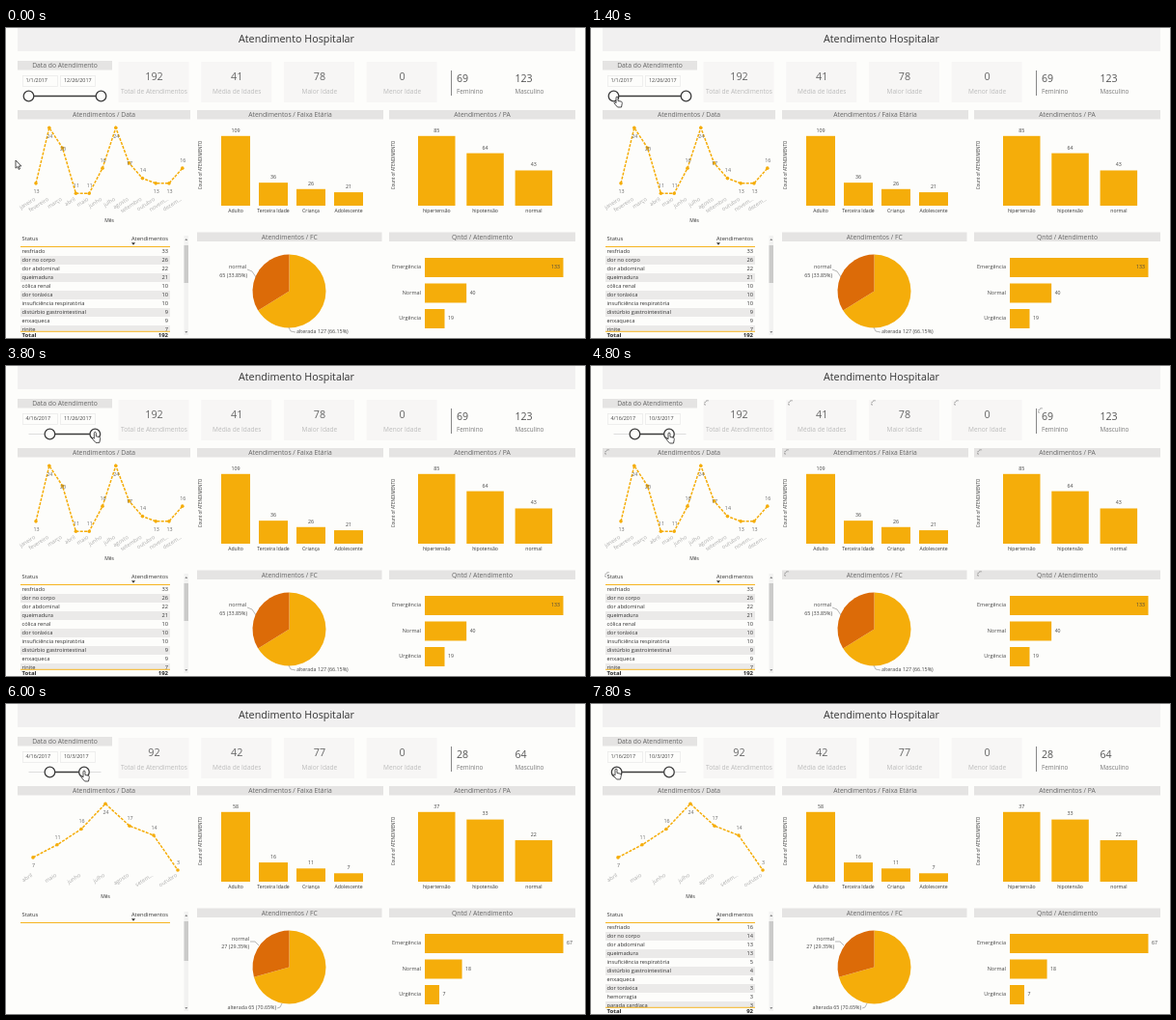
Write an HTML page with a canvas that moves like this. It is 600 px wide and 321 px high and loops after 8000 ms.

```html
<!DOCTYPE html>
<html lang="pt">
<head>
<meta charset="utf-8">
<title>Atendimento Hospitalar</title>
<style>
html, body { margin: 0; width: 100%; height: 100%; overflow: hidden; background: #fdfdfb; }
canvas { display: block; width: 600px; height: 321px; }
</style>
</head>
<body>
<canvas id="stage"></canvas>
<script>
const canvas = document.getElementById('stage');
const ctx = canvas.getContext('2d');
const ratio = window.devicePixelRatio || 1;
canvas.width = 600 * ratio;
canvas.height = 321 * ratio;

const LOOP = 8000, STEP = 200, SWAP = 5400, TABLE_READY = 6200;
const PAPER = '#fdfdfb', AMBER = '#f5ad0a', RUST = '#dc6b08', INK = '#444';

const before = {
  cards: [192, 41, 78, 0], gender: [69, 123],
  months: ['janeiro', 'fevereiro', 'março', 'abril', 'maio', 'junho', 'julho', 'agosto', 'setembro', 'outubro', 'novem…', 'dezem…'],
  line: [13, 24, 20, 11, 11, 16, 24, 17, 14, 13, 13, 16],
  lineX: 31, lineStep: 13.8, lineScale: 5.23, below: [0, 1, 6, 9, 10], beside: [2, 7], axisX: 107,
  ages: [109, 36, 26, 21], pressure: [85, 64, 43], urgency: [133, 40, 19],
  normal: 0.3385,
  pieLabels: [['normal', 249, 248, 'right'], ['65 (33.85%)', 250, 256.5, 'right'], ['alterada 127 (66.15%)', 301, 315, 'left']],
  leaders: [[250, 250, 255, 252, 259, 258], [293, 310, 295, 314, 300, 315]],
  rows: [['resfriado', 33], ['dor no corpo', 26], ['dor abdominal', 22], ['queimadura', 21], ['cólica renal', 10],
    ['dor toráxica', 10], ['insuficiência respiratória', 10], ['distúrbio gastrointestinal', 9], ['enxaqueca', 9], ['rinite', 7]],
  thumb: 39
};
const after = {
  cards: [92, 42, 77, 0], gender: [28, 64],
  months: ['abril', 'maio', 'junho', 'julho', 'agosto', 'setem…', 'outubro'],
  line: [7, 11, 16, 24, 17, 14, 3],
  lineX: 28, lineStep: 25, lineScale: 3.27, below: [0, 3], beside: [], axisX: 103,
  ages: [58, 16, 11, 7], pressure: [37, 33, 22], urgency: [67, 18, 7],
  normal: 0.2935,
  pieLabels: [['normal', 252, 243.5, 'right'], ['27 (29.35%)', 252, 251.5, 'right'], ['alterada 65 (70.65%)', 280, 315, 'right']],
  leaders: [[253, 246, 258, 246, 262, 250], [281, 315, 284, 314, 286, 310]],
  rows: [['resfriado', 16], ['dor no corpo', 14], ['dor abdominal', 13], ['queimadura', 13], ['insuficiência respiratória', 5],
    ['distúrbio gastrointestinal', 4], ['enxaqueca', 4], ['dor toráxica', 3], ['hemorragia', 3], ['parada cardíaca', 3]],
  thumb: 41
};

// Keys are [time, ...values]
const startDay = [[1400, 0], [2200, 105], [7200, 105], [7800, 15]];
const endDay = [[3400, 359], [4400, 275]];
const pointer = [[200, 10, 137], [1000, 26, 71], [1400, 26, 71], [2200, 46, 69], [2400, 46, 69], [3000, 97.5, 68],
  [3400, 97.5, 68], [4400, 80, 69], [6200, 80, 69], [6800, 45, 67], [7200, 45, 67], [7800, 25, 67]];
const spinners = [[119, 38], [206, 38], [292, 38], [378, 38], [465, 46], [16, 89], [202, 89], [402, 89], [16, 216], [202, 215], [402, 215]];

const arrowShape = new Path2D('M0 0V8.2L1.9 6.5 3.2 9.4 4.5 8.8 3.2 6H5.8Z');
const handShape = new Path2D('M0 1.2C0-.4 2-.4 2 1.2V4.5L5.2 5.1C6.2 5.4 6.4 6 6.2 7.5L5.5 11H1.6L-1.8 7.2C-2.4 6-1.2 5.6 0 6.8Z');

const lerp = (a, b, p) => a + (b - a) * p;
const smooth = p => p * p * (3 - 2 * p);

function track(keys, t) {
  const next = keys.findIndex(key => key[0] > t);
  if (next === 0) return keys[0].slice(1);
  if (next < 0) return keys[keys.length - 1].slice(1);
  const a = keys[next - 1], b = keys[next];
  const p = smooth((t - a[0]) / (b[0] - a[0]));
  return a.slice(1).map((v, i) => lerp(v, b[i + 1], p));
}

function text(value, x, y, size, color = INK, align = 'center', weight = 400) {
  ctx.font = `${weight} ${size}px "Open Sans", "Noto Sans", sans-serif`;
  ctx.textAlign = align;
  ctx.textBaseline = 'middle';
  ctx.fillStyle = color;
  ctx.fillText(value, x, y);
}

function rotatedText(value, x, y, angle, ...style) {
  ctx.save();
  ctx.translate(x, y);
  ctx.rotate(angle);
  text(value, 0, 0, ...style);
  ctx.restore();
}

function rect(x, y, w, h, color) {
  ctx.fillStyle = color;
  ctx.fillRect(x, y, w, h);
}

function polyline(points, color, width, dash = []) {
  ctx.beginPath();
  for (let i = 0; i < points.length; i += 2) ctx.lineTo(points[i], points[i + 1]);
  ctx.setLineDash(dash);
  ctx.strokeStyle = color;
  ctx.lineWidth = width;
  ctx.stroke();
  ctx.setLineDash([]);
}

function disc(x, y, r, fill, stroke) {
  ctx.beginPath();
  ctx.arc(x, y, r, 0, 7);
  ctx.fillStyle = fill;
  ctx.fill();
  if (!stroke) return;
  ctx.strokeStyle = stroke;
  ctx.lineWidth = 1.3;
  ctx.stroke();
}

function heading(label, x, y, w) {
  rect(x, y, w, 9.5, '#e5e4e3');
  text(label, x + w / 2, y + 5.5, 6.75, '#666');
}

function drawHeader(data) {
  rect(12, 0, 578, 24, '#f1f0f0');
  text('Atendimento Hospitalar', 301, 12.3, 10.75, '#333');
  heading('Data do Atendimento', 12, 34, 98);
  heading('Atendimentos / Data', 12, 85, 179);
  heading('Atendimentos / Faixa Etária', 198, 85, 193);
  heading('Atendimentos / PA', 397, 85, 193);
  heading('Atendimentos / FC', 198, 211.5, 191.5);
  heading('Qntd / Atendimento', 397, 211.5, 193);
  ['Total de Atendimentos', 'Média de Idades', 'Maior Idade', 'Menor Idade'].forEach((label, i) => {
    const x = 116.5 + i * 85.7;
    rect(x, 35, 73, 42, '#f7f6f5');
    text(data.cards[i], x + 37, 51.3, 10.8, '#666');
    text(label, x + 37, 66, 6.55, '#bbb');
  });
  polyline([461.5, 44, 461.5, 70], '#888', 1);
  ['Feminino', 'Masculino'].forEach((label, i) => {
    text(data.gender[i], 467 + i * 60.5, 53.3, 10.6, '#555', 'left');
    text(label, 467 + i * 60.5, 66, 6.3, '#777', 'left');
  });
}

function drawSlider(t) {
  const days = [track(startDay, t)[0], track(endDay, t)[0]];
  const [left, right] = days.map(day => 23.5 + day * 75 / 359);
  days.forEach((day, i) => {
    const date = new Date(2017, 0, 1 + Math.round(day));
    ctx.strokeStyle = '#ebebea';
    ctx.lineWidth = 0.8;
    ctx.strokeRect(17.5 + i * 39, 49.5, 36, 11);
    text(`${date.getMonth() + 1}/${date.getDate()}/2017`, 20.5 + i * 39.5, 55, 5.4, INK, 'left');
  });
  polyline([23.5, 70.5, 98.5, 70.5], '#ddd', 1);
  polyline([left, 70.5, right, 70.5], '#3c3c3c', 1.4);
  disc(left, 70.5, 5.3, PAPER, '#3c3c3c');
  disc(right, 70.5, 5.3, PAPER, '#3c3c3c');
}

function drawLine(data) {
  const points = data.line.map((v, i) => [data.lineX + i * data.lineStep, 103.3 + (24 - v) * data.lineScale]);
  polyline(points.flat(), AMBER, 1.5, [3, 1.3]);
  points.forEach(([x, y], i) => {
    const offset = data.below.includes(i) ? 9 : data.beside.includes(i) ? 1 : -7.5;
    disc(x, y, 1.8, AMBER);
    text(data.line[i], x + 0.5, y + offset, 5.3, '#666');
    rotatedText(data.months[i], x - 1, 177, -0.56, 5.6, '#aaa', 'right');
  });
  text('Mês', data.axisX, 200, 5, '#333');
}

function drawColumns(values, heights, labels, x, w, step) {
  values.forEach((v, i) => {
    const h = heights[i] * 72.2, mid = x + i * step + w / 2;
    rect(x + i * step, 184 - h, w, h, AMBER);
    text(v, mid, 178.5 - h, 5.3);
    text(labels[i], mid, 189.7, 5.1, '#333');
  });
}

function drawUrgency(values, widths) {
  ['Emergência', 'Normal', 'Urgência'].forEach((label, i) => {
    const w = widths[i] * 143.5, y = 238 + i * 26.5;
    rect(434, y, w, 20, AMBER);
    text(label, 430, y + 10, 5.5, INK, 'right');
    const inside = values[i] > 99;
    text(values[i], 434 + w + (inside ? -3.5 : 3.5), y + 10, 5.2, INK, inside ? 'right' : 'left');
  });
}

function drawPie(data, share) {
  const top = -Math.PI / 2, split = top - share * 2 * Math.PI;
  [[top, split + 2 * Math.PI, AMBER], [split, top, RUST]].forEach(([from, to, color]) => {
    ctx.beginPath();
    ctx.moveTo(293.5, 272.5);
    ctx.arc(293.5, 272.5, 38, from, to);
    ctx.fillStyle = color;
    ctx.fill();
  });
  data.leaders.forEach(points => polyline(points, '#999', 0.7));
  data.pieLabels.forEach(([label, x, y, align]) => text(label, x, y, 5.35, INK, align));
}

function drawTable(data, ready) {
  text('Status', 16.5, 218, 5.8, '#333', 'left');
  text('Atendimentos', 168, 218, 5.8, '#333', 'right');
  ctx.fillStyle = '#333';
  ctx.fill(new Path2D('M130 222.3h4l-2 2.4z'));
  polyline([15, 226.5, 170, 226.5], AMBER, 0.9);
  rect(184.5, 215, 4.5, 103, '#f2f2f1');
  rect(184.5, 225, 4.5, data.thumb, '#cbcbca');
  ctx.fillStyle = '#888';
  ctx.fill(new Path2D('M185.3 220h3l-1.5-2zM185.3 314h3l-1.5 2z'));
  if (!ready) return;
  ctx.save();
  ctx.beginPath();
  ctx.rect(12, 227, 160, 87);
  ctx.clip();
  data.rows.forEach(([name, count], i) => {
    const y = 231.5 + i * 9;
    if (i % 2) rect(15, y - 4.5, 155, 9, '#ebeae9');
    text(name, 16.5, y, 5.7, '#333', 'left');
    text(count, 168, y, 5.7, '#333', 'right');
  });
  ctx.restore();
  polyline([15, 314.3, 170, 314.3], AMBER, 0.9);
  text('Total', 16.5, 318.5, 6, '#222', 'left', 700);
  text(data.cards[0], 168, 318.5, 6, '#222', 'right', 700);
}

function drawSpinners(t) {
  const turn = Math.PI + (t - 4800) / 1000 * Math.PI * 2;
  spinners.forEach(([x, y]) => {
    ctx.beginPath();
    ctx.arc(x + 2, y + 1, 3.2, turn - 0.5, turn + 1.9);
    ctx.setLineDash([1.5, 0.8]);
    ctx.strokeStyle = '#777';
    ctx.lineWidth = 1;
    ctx.stroke();
    ctx.setLineDash([]);
  });
}

function drawPointer(t) {
  const [x, y] = track(pointer, t);
  const shape = y > 78 ? arrowShape : handShape;
  ctx.save();
  ctx.translate(x, y);
  ctx.fillStyle = '#fff';
  ctx.fill(shape);
  ctx.strokeStyle = '#222';
  ctx.lineWidth = 0.8;
  ctx.stroke(shape);
  ctx.restore();
}

function draw(t) {
  const data = t < SWAP ? before : after;
  const morph = smooth(Math.min(1, Math.max(0, (t - SWAP + STEP) / 600)));
  const sizes = key => before[key].map((v, i) => lerp(v / before[key][0], after[key][i] / after[key][0], morph));

  ctx.setTransform(ratio, 0, 0, ratio, 0, 0);
  rect(0, 0, 600, 321, PAPER);
  drawHeader(data);
  drawSlider(t);
  drawLine(data);
  drawColumns(data.ages, sizes('ages'), ['Adulto', 'Terceira Idade', 'Criança', 'Adolescente'], 223, 30, 39);
  drawColumns(data.pressure, sizes('pressure'), ['hipertensão', 'hipotensão', 'normal'], 427, 38.5, 50.3);
  [202, 402].forEach(x => rotatedText('Count of ATENDIMENTO', x, 142, -Math.PI / 2, 4.5, '#333'));
  drawUrgency(data.urgency, sizes('urgency'));
  drawPie(data, lerp(before.normal, after.normal, morph));
  drawTable(data, t < SWAP || t >= TABLE_READY);
  if (t >= 4600 && t < SWAP) drawSpinners(t);
  drawPointer(t);
}

function tick() {
  draw(Math.floor(performance.now() % LOOP / STEP) * STEP);
  requestAnimationFrame(tick);
}
tick();
</script>
</body>
</html>
```
